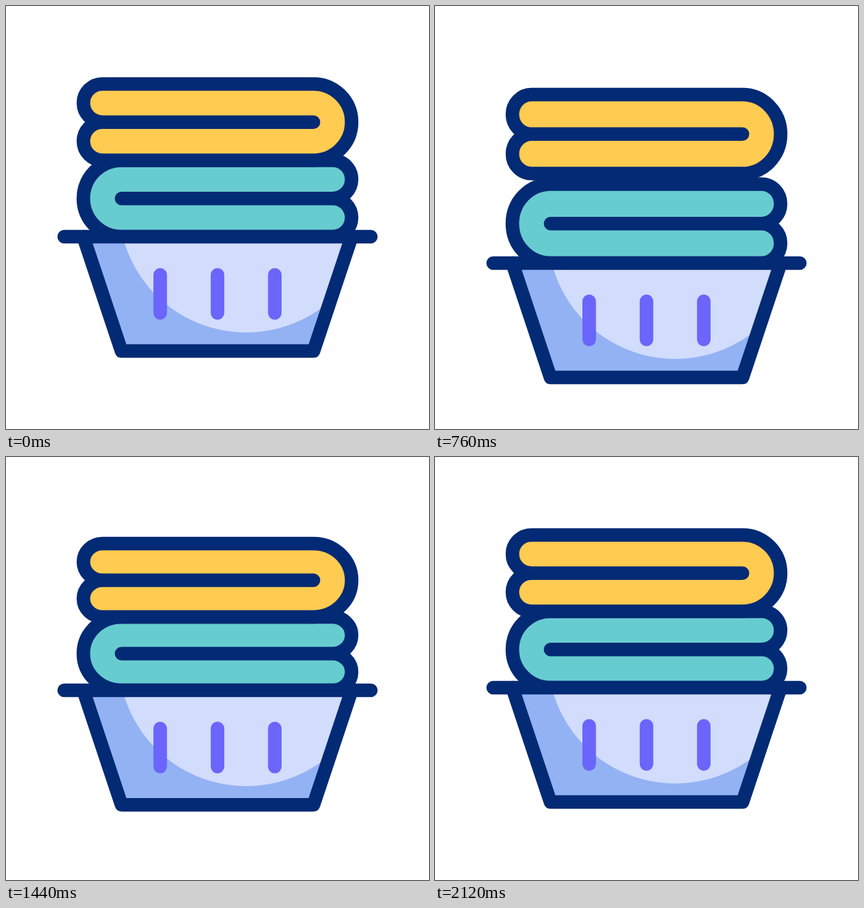
Animation, 640 px wide and 640 px high, one loop 2.28 s. Source, as an HTML page:

```html
<!DOCTYPE html>
<html lang="en">
<head>
<meta charset="utf-8">
<title>Laundry basket</title>
<style>
  html, body { margin: 0; width: 100%; height: 100%; overflow: hidden; background: #fff; }
  svg { display: block; width: 100vw; height: 100vh; }
  .line { stroke: #032a74; stroke-width: 20.5; stroke-linecap: round; stroke-linejoin: round; }
  .slot { stroke: #6b65fb; stroke-width: 20.5; stroke-linecap: round; }
</style>
</head>
<body>
<svg viewBox="0 0 640 640">
  <defs>
    <clipPath id="body"><path d="M117 348.9 174.7 522.1H465.3L523 348.9Z"/></clipPath>
  </defs>
  <path id="lower" class="line" fill="#67ccd0"/>
  <path id="upper" class="line" fill="#ffcb50"/>
  <g id="basket">
    <g clip-path="url(#body)">
      <rect x="100" y="340" width="440" height="200" fill="#93b2f4"/>
      <circle cx="363.5" cy="301" r="193" fill="#d2dcfd"/>
    </g>
    <path class="slot" d="M233.3 406.8V464.4M320 406.8V464.4M406.7 406.8V464.4"/>
    <path class="line" fill="none" d="M117 348.9 174.7 522.1H465.3L523 348.9M88 348.9H552"/>
  </g>
</svg>
<script>
  const LOOP = 2280, STEP = 40;
  const RIM = 348.9, FOLD = 57.75;

  const inOut = p => x => x < .5 ? .5 * (2 * x) ** p : 1 - .5 * (2 - 2 * x) ** p;
  const smooth = inOut(2);
  const fall = x => x * x;

  // Each row: start, end, value from, value to, easing
  const drop = [
    [120, 760, 0, 40, smooth],
    [780, 1650, 40, 0, inOut(2.2)]
  ];
  const stretch = [
    [90, 560, 1, 1.11, smooth],
    [560, 1150, 1.11, .78, smooth],
    [1150, 1680, .78, 1.087, smooth],
    [1680, 2120, 1.087, 1, smooth]
  ];
  const hop = [
    [160, 500, 0, 30, smooth],
    [500, 880, 30, 0, fall]
  ];

  function valueAt(track, t) {
    let value = track[0][2];
    for (const [start, end, from, to, ease] of track) {
      if (t < start) break;
      value = from + (to - from) * ease(Math.min(1, (t - start) / (end - start)));
    }
    return value;
  }

  // A folded towel of two layers, each h high, standing on the line y = base
  function towel(base, h, flip) {
    const x = v => flip ? 640 - v : v;
    const sweep = flip ? 0 : 1;
    const open = x(146), bend = x(465.2);
    const top = base - 2 * h, mid = base - h;
    const lobe = y => `A28.9 ${h / 2} 0 0 ${sweep} ${open} ${y}`;
    return `M${open} ${top}H${bend}A${FOLD} ${h} 0 0 ${sweep} ${bend} ${base}` +
      `H${open}${lobe(mid)}${lobe(top)}ZM${open} ${mid}H${bend}`;
  }

  const [lower, upper, basket] = ["lower", "upper", "basket"].map(id => document.getElementById(id));

  function draw(t) {
    const dy = valueAt(drop, t);
    const h = FOLD * valueAt(stretch, t);
    const base = RIM + dy;
    lower.setAttribute("d", towel(base, h, true));
    upper.setAttribute("d", towel(base - 2 * h - valueAt(hop, t), h, false));
    basket.setAttribute("transform", `translate(0 ${dy})`);
  }

  const begin = performance.now();
  function tick() {
    const t = (performance.now() - begin) % LOOP;
    draw(Math.floor(t / STEP) * STEP);
    requestAnimationFrame(tick);
  }
  tick();
</script>
</body>
</html>
```
